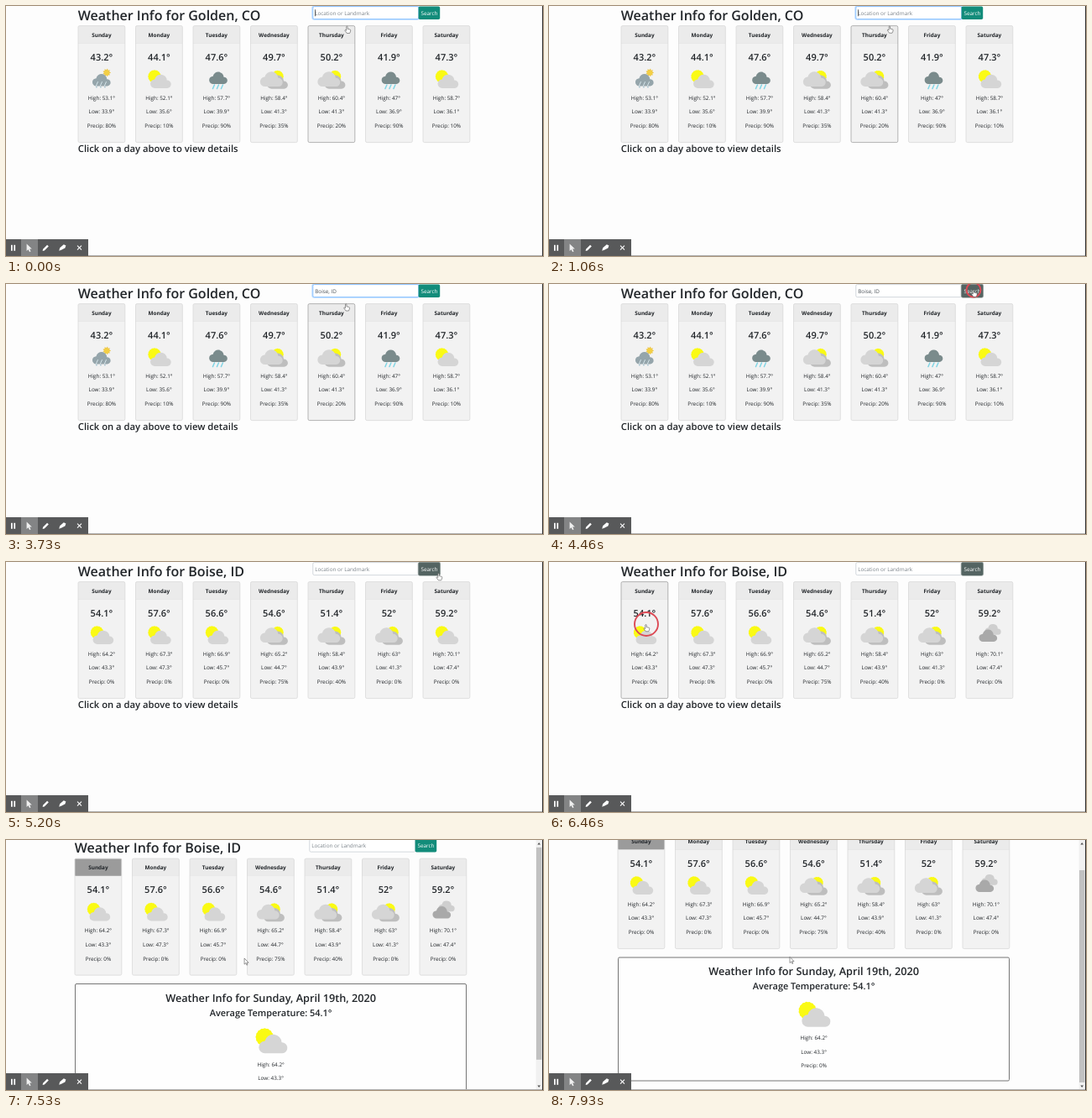
Recreate the animation shown at these times as an HTML page. Size 640 by 298 pixels, loop 8000 ms.

```html
<!DOCTYPE html>
<html lang="en">
<head>
<meta charset="utf-8">
<title>Weather Info</title>
<style>
html, body { margin: 0; width: 100%; height: 100%; overflow: hidden; background: #fdfdfd; }
svg { display: block; width: 640px; height: 298px; }
text { font-family: "Open Sans", "Noto Sans", sans-serif; fill: #212529; text-rendering: geometricPrecision; white-space: pre; }
.head { font-weight: 600; }
.day { font-weight: 700; }
</style>
</head>
<body>
<svg id="stage" viewBox="0 0 640 298" xmlns="http://www.w3.org/2000/svg"></svg>
<script>
const LOOP = 8000;
const SEARCH = 4900, SWAP = 5400, OPEN = 6600;
const SCROLL = [7500, 7800, 32.5];
const SMALL = 6.35;
const DAYS = ['Sunday', 'Monday', 'Tuesday', 'Wednesday', 'Thursday', 'Friday', 'Saturday'];
const FORECAST = {
  'Golden, CO': [
    '43.2 53.1 33.9 80 showers', '44.1 52.1 35.6 10 sunny', '47.6 57.7 39.9 90 rain',
    '49.7 58.4 41.3 35 mostly', '50.2 60.4 41.3 20 mostly', '41.9 47 36.9 90 rain',
    '47.3 58.7 36.1 10 sunny'],
  'Boise, ID': [
    '54.1 64.2 43.3 0 sunny', '57.6 67.3 47.3 0 sunny', '56.6 66.9 45.7 0 sunny',
    '54.6 65.2 44.7 75 mostly', '51.4 58.4 43.9 40 mostly', '52 63 41.3 0 mostly',
    '59.2 70.1 47.4 0 sunny']
};
const QUERY = 'Boise, ID';
const KEYS = [1800, 2000, 2260, 2460, 2600, 2800, 3000, 3130, 3400];
// time, x, y of the pointer tip
const POINTER = [
  [0, 406.4, 24.2], [930, 406.4, 24.2], [1200, 405.2, 23.7], [3800, 405.2, 23.7],
  [4380, 506, 7], [4750, 506, 7], [5150, 515.5, 13.5], [5330, 515.5, 13.5],
  [6080, 115.5, 74.5], [6650, 115.5, 74.5], [7300, 284, 141], [7500, 284, 141],
  [7800, 287, 139.3], [8000, 287, 139.3]];
const CLICKS = [[4430, 506, 7], [6340, 116, 74]];

const stage = document.getElementById('stage');
const cardX = i => 86 + i * 68.5;
const rect = (x, y, w, h, fill, more = '') =>
  `<rect x="${x}" y="${y}" width="${w}" height="${h}" fill="${fill}" ${more}/>`;
const text = (x, y, size, str, more = '') =>
  `<text x="${x}" y="${y}" font-size="${size}" ${more}>${str}</text>`;
const mid = 'text-anchor="middle"';

// ---- weather icons, drawn around 0,0 ----
const cloud = (x, y, s, fill) =>
  `<path transform="translate(${x} ${y}) scale(${s})" fill="${fill}"
    d="M5.5 17a5.3 5.3 0 0 1-.3-10.6a7.4 7.4 0 0 1 14.6 1.2a4.7 4.7 0 0 1 .4 9.4z"/>`;

function star(points, outer, inner) {
  return Array.from({ length: points * 2 }, (_, i) => {
    const a = i * Math.PI / points, r = i % 2 ? inner : outer;
    return (r * Math.cos(a)).toFixed(2) + ',' + (r * Math.sin(a)).toFixed(2);
  }).join(' ');
}
const sun = (x, y, r) =>
  `<g transform="translate(${x} ${y})"><polygon class="sun" fill="#fafa14" points="${star(16, r, r * 0.95)}"/></g>`;
const drops = (xs, y, color, w) => xs.map(x =>
  `<path d="M${x} ${y}l-2 4.6" stroke="${color}" stroke-width="${w}" stroke-linecap="round"/>`).join('');

const ICONS = {
  sunny: sun(-5.4, -3, 7.8) + cloud(-10.4, -6, 1, '#d5d5d5'),
  mostly: sun(4.3, -3, 7.2) + cloud(-8.2, -5.2, 1, '#bebebe') + cloud(-16.6, -9.5, 1.09, '#d5d5d5'),
  cloudy: cloud(-5.5, -13.5, 0.78, '#cfcfcf') + cloud(-12.5, -7, 0.88, '#a9a9a9'),
  rain: cloud(-8.8, -9, 0.88, '#7a8b8c') + drops([-2.5, 2.5, 7.5], 7, '#7fd4e4', 1.4),
  showers:
    `<g transform="translate(6.2 -7.6)"><polygon points="${star(9, 5, 3.2)}" fill="#ecc544"/><circle r="3" fill="#f3cf45"/></g>` +
    cloud(-11, -6.5, 0.88, '#95a5ab') + drops([-4.5, 0.5, 5.5], 3.5, '#dcebf1', 0.9) +
    [-6, -1, 4].map(x => `<circle cx="${x}" cy="9.8" r=".8" fill="#8fb4c6"/>`).join('')
};
const icon = (name, x, y, s = 1, more = '') =>
  `<g transform="translate(${x} ${y}) scale(${s})" ${more}>${ICONS[name]}</g>`;

// ---- page parts ----
function card(i, row, city) {
  const [temp, high, low, rain, sky] = row.split(' ');
  const x = cardX(i), c = x + 27.9;
  const late = city === 'Boise, ID' && i === 6;
  return rect(x, 23.6, 55.8, 139, '#f2f2f2', 'rx="1.7"') +
    rect(x, 44, 55.8, 0.5, '#d8d8d8') +
    rect(x, 23.6, 55.8, 20.7, '#ebebeb', `rx="1.2" class="top${i}"`) +
    rect(x, 23.6, 55.8, 139, 'none', `rx="1.7" stroke="#dadada" stroke-width=".8" class="edge${i}"`) +
    text(c, 36.6, 6.4, DAYS[i], mid + ' class="day"') +
    text(c, 64.7, 11, temp + '°', mid + ' class="head"') +
    icon(sky, c, 87, 1, late ? 'id="before"' : '') +
    (late ? icon('cloudy', c, 87, 1, 'id="after"') : '') +
    text(c, 111.7, SMALL, `High: ${high}°`, mid) +
    text(c, 128.2, SMALL, `Low: ${low}°`, mid) +
    text(c, 145, SMALL, `Precip: ${rain}%`, mid);
}

const report = (city, id) => `<g id="${id}">` +
  text(85.8, 16.5, 16, 'Weather Info for ' + city, 'class="head"') +
  FORECAST[city].map((row, i) => card(i, row, city)).join('') + '</g>';

const details = () => `<g id="details">` +
  rect(86.5, 173, 466, 147, '#fefefe', 'rx="1.5" stroke="#757575"') +
  text(319.6, 194, 12.7, 'Weather Info for Sunday, April 19th, 2020', mid + ' class="head"') +
  text(319.6, 211.4, 10.93, 'Average Temperature: 54.1°', mid + ' class="head"') +
  icon('sunny', 319.6, 240.6, 1.38) +
  text(319.6, 271, SMALL, 'High: 64.2°', mid) +
  text(319.6, 287.6, SMALL, 'Low: 43.3°', mid) +
  text(319.6, 304, SMALL, 'Precip: 0%', mid) + '</g>';

const form =
  rect(365, 0, 127.4, 16, 'none', 'id="glow" rx="2.2" stroke="#bfdeff" stroke-width="1.4"') +
  rect(365.8, 0.6, 126, 15, '#fff', 'id="field" rx="1.6" stroke-width=".9"') +
  text(368.2, 10.7, SMALL, '', 'id="entry"') +
  rect(0, 4.2, 0.7, 8, '#222', 'id="caret"') +
  rect(491.4, 0.2, 26, 15.8, 'none', 'id="ring" rx="2.2" stroke="#a3adab" stroke-width="1.3"') +
  rect(491.6, 0.4, 25.6, 15.5, '#128c7a', 'id="button" rx="1.7"') +
  text(504.5, 10.7, SMALL, 'Search', mid + ' style="fill:#fff"');

const scrollbar = `<g id="bar">` +
  rect(631.6, 0, 7.4, 298, '#f1f1f1') +
  rect(632, 8, 6.4, 253, '#c1c1c1', 'id="thumb"') +
  `<path d="M633.4 5.4l1.8-2.4l1.8 2.4zM633.4 292.6l1.8 2.4l1.8-2.4z" fill="#505050"/></g>`;

const toolbar =
  rect(0, 278, 98, 20, '#58595a') +
  rect(18, 278, 20, 20, '#838485') +
  rect(6, 284.8, 1.7, 7, '#fff') + rect(9.4, 284.8, 1.7, 7, '#fff') +
  `<path d="M24.6 283.4v8.6l2-1.8l1.5 3l1.4-.7l-1.4-2.9h2.7z" fill="#f0f0f0"/>
   <path d="M43.6 291.9l.5-2.2l5-5l1.7 1.7l-5 5z" fill="#fff"/>
   <path d="M63.2 291.8l1-3.6l4.6-3.9l2.6 1.2l-1 3l-4.4 2.3z" fill="#fff"/>
   <path d="M85 285.6l5 5m0-5l-5 5" stroke="#fff" stroke-width="1.1"/>`;

const pointers =
  `<g id="pointer" stroke="#555" stroke-width=".7" stroke-linejoin="round" fill="#fff">
   <path id="arrow" d="M0 0v8.2l1.9-1.7l1.3 2.8l1.2-.5l-1.3-2.8h2.6z"/>
   <path id="hand" d="M-.8.5q.8-1 1.6 0v3l3.2.8q1 .3.9 1.4l-.5 2.1l-.8 1.6h-3.8l-2.6-3.6q0-1.2 1.1-.8l.9.7z"/>
   <path id="beam" d="M-1.2-3.5h2.4M0-3.5v7M-1.2 3.5h2.4"/></g>`;

stage.innerHTML = rect(0, 0, 640, 298, '#fdfdfd') +
  `<g id="page">${report('Golden, CO', 'old')}${report('Boise, ID', 'new')}` +
  text(85.8, 174.4, 11.25, 'Click on a day above to view details', 'id="hint" class="head"') +
  details() + form + '</g>' + scrollbar +
  rect(0, 297, 640, 1, '#b0b0b0') + rect(639, 0, 1, 298, '#333') + toolbar +
  `<circle id="click" fill="none" stroke="#dc4a55" stroke-width="1.9"/>` + pointers;

const el = {};
stage.querySelectorAll('[id]').forEach(n => el[n.id] = n);
const suns = stage.querySelectorAll('.sun');
const edges = DAYS.map((_, i) => stage.querySelectorAll('.edge' + i));
const top0 = el.new.querySelector('.top0');

const set = (node, attrs) => { for (const k in attrs) node.setAttribute(k, attrs[k]); };
const show = (node, on) => { node.style.display = on ? '' : 'none'; };
const clamp = v => Math.max(0, Math.min(1, v));
const ease = v => v * v * (3 - 2 * v);

function pointerAt(t) {
  const i = Math.max(1, POINTER.findIndex(p => p[0] > t));
  const [t0, x0, y0] = POINTER[i - 1], [t1, x1, y1] = POINTER[i];
  const k = ease(clamp((t - t0) / (t1 - t0)));
  return [x0 + (x1 - x0) * k, y0 + (y1 - y0) * k];
}

function drawEntry(t) {
  const focused = t < 4450;
  const typed = t < SEARCH ? QUERY.slice(0, KEYS.filter(k => k <= t).length) : '';
  el.entry.textContent = typed || 'Location or Landmark';
  el.entry.style.fill = typed ? '#495057' : '#7b838a';
  show(el.glow, focused);
  set(el.field, { stroke: focused ? '#80bdff' : '#ced4da' });
  const last = KEYS.filter(k => k <= t).pop() || 0;
  show(el.caret, focused && (t - last) % 1060 < 530 && t < 3700 || focused && t > 4200);
  set(el.caret, { x: 368.3 + (typed ? el.entry.getComputedTextLength() : 0) });
}

function draw(t) {
  const open = t >= OPEN;
  const scroll = SCROLL[2] * ease(clamp((t - SCROLL[0]) / (SCROLL[1] - SCROLL[0])));
  const dx = open ? -4 : 0, dy = open ? -0.5 - scroll : 0;
  set(el.page, { transform: `translate(${dx} ${dy})` });
  show(el.old, t < SEARCH);
  show(el.new, t >= SEARCH);
  show(el.before, t < SWAP);
  show(el.after, t >= SWAP);
  show(el.hint, !open);
  show(el.details, open);
  show(el.bar, open);
  set(el.thumb, { y: 8 + scroll * 0.86 });
  set(top0, { fill: open ? '#9b9b9b' : '#ebebeb' });
  suns.forEach(s => set(s, { transform: `rotate(${t * 0.03})` }));

  drawEntry(t);
  const pressed = t >= 4450 && !open;
  set(el.button, { fill: pressed ? '#546462' : '#128c7a' });
  show(el.ring, pressed);

  const [x, y] = pointerAt(t);
  const px = x - dx, py = y - dy;
  const over = DAYS.findIndex((_, i) =>
    px > cardX(i) && px < cardX(i) + 56 && py > 23.5 && py < 162.6);
  edges.forEach((pair, i) => pair.forEach(e =>
    set(e, { stroke: i === over ? '#a2a2a2' : '#dadada' })));
  const hand = over >= 0 || (py < 16 && px >= 492 && px < 518);
  const beam = !hand && py < 16 && px > 365 && px < 492;
  show(el.hand, hand);
  show(el.beam, beam);
  show(el.arrow, !hand && !beam);
  set(el.pointer, { transform: `translate(${x.toFixed(2)} ${y.toFixed(2)}) scale(.88)` });

  const hit = CLICKS.find(c => t >= c[0] && t < c[0] + 280);
  show(el.click, hit);
  if (hit) {
    const age = t - hit[0];
    set(el.click, {
      cx: hit[1], cy: hit[2],
      r: 6 + 8 * clamp(age / 100),
      opacity: 1 - clamp((age - 160) / 120)
    });
  }
}

function tick() {
  draw(performance.now() % LOOP);
  requestAnimationFrame(tick);
}
tick();
</script>
</body>
</html>
```
